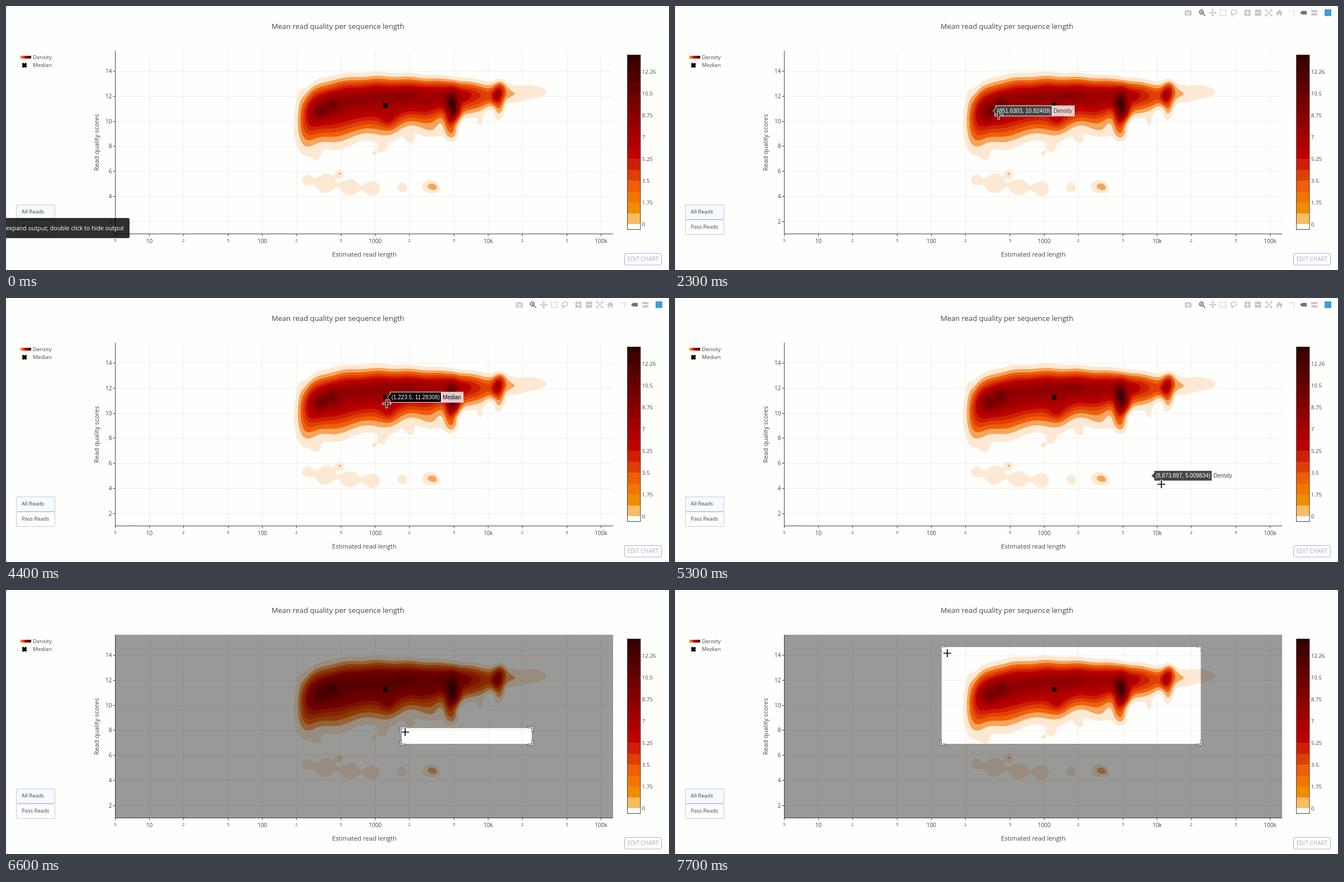
An HTML page that plays this animation: 1186x472 px, repeating every 8000 ms.

```html
<!DOCTYPE html>
<html lang="en">
<head>
<meta charset="utf-8">
<title>Read quality chart</title>
<style>
  html, body { margin: 0; width: 100%; height: 100%; overflow: hidden; background: #fefefd; }
  svg { display: block; width: 100%; height: 100%; }
  text { font-family: "Open Sans", "Noto Sans", sans-serif; font-size: 9.7px; fill: #444; white-space: pre; }
  .tag text { font-family: "Liberation Sans", Arial, sans-serif; font-size: 10px; }
</style>
</head>
<body>
<svg id="stage" viewBox="0 0 1186 472"></svg>
<script>
const LOOP = 8000;
const PLOT = { l: 195.5, t: 80, r: 1086, b: 407.5 };
const MEDIAN = { x: 678.3, y: 177.4 };
const stage = document.getElementById('stage');

function el(tag, attrs, parent = stage, text) {
  const node = document.createElementNS('http://www.w3.org/2000/svg', tag);
  set(node, attrs);
  if (text !== undefined) node.textContent = text;
  parent.appendChild(node);
  return node;
}
function set(node, attrs) {
  for (const k in attrs) node.setAttribute(k, attrs[k]);
}
const group = (attrs = {}, parent = stage) => el('g', attrs, parent);
const label = (x, y, str, attrs = {}, parent = stage) => el('text', { x, y, ...attrs }, parent, str);
const show = (node, on) => set(node, { visibility: on ? 'visible' : 'hidden' });
const clamp01 = v => Math.min(1, Math.max(0, v));
const lerp = (a, b, k) => a + (b - a) * k;

// Axis scales
const px = lg => 256.5 + 202 * (lg - 1);
const py = v => 161.2 + 22.4 * (12 - v);

// Colour of a density level: orange to red, then red to near black
const mix = (a, b, k) => `rgb(${a.map((v, i) => Math.round(lerp(v, b[i], k)))})`;
const ORANGE = [240, 94, 8], RED = [190, 0, 0], DARK = [50, 0, 0];
const LEVELS = ['#fde9d3', '#f5a55c'];
for (let n = 3; n <= 15; n++) {
  LEVELS.push(n < 6 ? mix(ORANGE, RED, (n - 3) / 3) : mix(RED, DARK, (n - 6) / 9));
}

const bell = (d, s) => Math.exp(-d * d / (2 * s * s));
const rise = (x, mid, w) => 1 / (1 + Math.exp((mid - x) / w));

// Local clusters: x, y, spread x, spread y, strength
const CLUSTERS = [
  [561, 188, 9, 10, 2.5], [583, 176, 8, 11, 2.3], [706, 160, 14, 6, 1], [684, 205, 9, 9, 1.4],
  [798, 185, 8, 19, 10], [796, 228, 9, 12, 2], [822, 160, 5, 5, 1.2],
  [881, 156, 7, 12, 4.2], [881, 180, 7, 18, 2.4], [945, 154, 20, 10, 1],
  [556, 266, 7, 9, 1], [673, 256, 7, 7, 0.9], [722, 241, 9, 9, 0.9], [768, 225, 16, 11, 0.8],
  [850, 211, 6, 10, 0.9]
];
// Isolated patches: x, y, radius
[[539, 312, 7], [571, 317, 16], [597, 299, 5], [616, 324, 13.5], [656, 326, 12.5],
  [709, 325, 8.5], [755, 324, 10], [768, 324, 7], [660, 263, 3]
].forEach(([x, y, r]) => CLUSTERS.push([x, y, r, r, 1.7]));

// Density along one column: a skewed ridge plus the clusters
function column(x) {
  const fall = clamp01((x - 640) / 300);
  const mid = 160 + 45 * Math.exp((523 - x) / 55) - 0.06 * Math.max(0, x - 850) + 0.8 * Math.sin(x / 9);
  const up = 25 - 0.033 * (x - 560) + 16 * bell(x - 520, 7);
  const down = 38 - 26 * fall * fall * (3 - 2 * fall) + 2.5 * Math.cos((x - 680) * Math.PI / 40);
  const peak = 9.3 * rise(x, 533, 8.5) * (1 - rise(x, 855, 38));
  const near = CLUSTERS.filter(c => Math.abs(x - c[0]) < 4 * c[2] + 2);
  return y => {
    const wx = x + 1.5 * Math.sin(y / 8), wy = y + 1.2 * Math.sin(x / 7);
    return near.reduce((sum, [cx, cy, sx, sy, a]) => sum + a * bell(wx - cx, sx) * bell(wy - cy, sy),
      peak * bell(y - mid, y < mid ? up : down));
  };
}

// One path per level, built from thin upright strips
function drawDensity(parent) {
  const W = 0.5, TOP = 108, BOTTOM = 346;
  const paths = LEVELS.map(() => '');
  for (let x = 500; x < 990; x += W) {
    const at = column(x + W / 2);
    const vals = [];
    for (let y = TOP; y <= BOTTOM; y++) vals.push(at(y));
    const max = Math.max(...vals);
    for (let n = 1; n <= LEVELS.length && n < max; n++) {
      for (let i = 1; i < vals.length; i++) {
        const [a, b] = [vals[i - 1], vals[i]];
        if (a < n === b < n) continue;
        const y = (TOP + i - 1 + (n - a) / (b - a)).toFixed(1);
        paths[n - 1] += a < n ? `M${x} ${y}h${W}` : `V${y}h${-W}Z`;
      }
    }
  }
  paths.forEach((d, i) => d && el('path', { d, fill: LEVELS[i] }, parent));
  el('ellipse', { cx: 222.5, cy: 406.5, rx: 3, ry: 1.3, fill: LEVELS[0] }, parent);
}

const cross = (x, y, parent) => el('path', {
  d: 'M-3.4-3.4L3.4 3.4M-3.4 3.4L3.4-3.4', stroke: '#000', 'stroke-width': 4, transform: `translate(${x} ${y})`
}, parent);

function drawChart() {
  el('path', { d: 'M.5 0V472', stroke: '#f1f1ef' });
  const mid = { 'text-anchor': 'middle' };
  label(593.7, 40.7, 'Mean read quality per sequence length', { ...mid, style: 'font-size:13.05px' });
  label(641, 448, 'Estimated read length', { ...mid, style: 'font-size:11.3px' });
  label(0, 0, 'Read quality scores', {
    ...mid, style: 'font-size:11.3px', transform: 'translate(166.3 244) rotate(-90)'
  });

  const grid = group({ stroke: '#eee' });
  const ticks = group({ stroke: '#444' });
  const xTick = (lg, str, size, base) => {
    const x = Math.floor(px(lg)) + 0.5;
    if (x > 200) el('path', { d: `M${x} ${PLOT.t}V${PLOT.b}` }, grid);
    el('path', { d: `M${x} ${PLOT.b}v4` }, ticks);
    label(x, base, str, { ...mid, style: `font-size:${size}px` });
  };
  xTick(Math.log10(5), '5', 7.5, 422);
  ['10', '100', '1000', '10k', '100k'].forEach((str, i) => {
    xTick(i + 1, str, 10, 424);
    if (i < 4) [2, 5].forEach(m => xTick(i + 1 + Math.log10(m), m, 7.5, 422));
  });
  for (let v = 2; v <= 14; v += 2) {
    const y = Math.floor(py(v)) + 0.5;
    el('path', { d: `M${PLOT.l} ${y}H${PLOT.r}` }, grid);
    el('path', { d: `M${PLOT.l} ${y}h-4` }, ticks);
    label(189.5, y + 3.6, v, { 'text-anchor': 'end', style: 'font-size:10px' });
  }
  drawDensity(group());
  cross(MEDIAN.x, MEDIAN.y, stage);
  el('path', { d: `M${PLOT.l} ${PLOT.t}V${PLOT.b}H${PLOT.r}`, stroke: '#444', fill: 'none' });
}

function drawSides() {
  const ramp = el('linearGradient', { id: 'ramp' }, el('defs', {}));
  ['#f8bc63', LEVELS[2], LEVELS[5], LEVELS[9], LEVELS[14]].forEach((c, i) =>
    el('stop', { offset: i / 4, 'stop-color': c }, ramp));
  el('rect', { x: 25, y: 89, width: 20, height: 5, fill: 'url(#ramp)' });
  cross(33, 106, stage);
  label(48, 94.5, 'Density');
  label(48, 109.3, 'Median');

  const frame = { x: 1111.5, y: 87.5, width: 23.5, height: 312 };
  el('rect', { ...frame, fill: '#fff' });
  ['#f8bc63', '#f18c00', '#f37500', ...LEVELS.slice(2)].forEach((fill, i) => {
    const bottom = 390 - 19.5 * i;
    const top = Math.max(frame.y, bottom - 19.5);
    el('rect', { ...frame, y: top, height: bottom - top, fill, 'shape-rendering': 'crispEdges' });
  });
  el('rect', { ...frame, fill: 'none', stroke: '#444' });
  ['0', '1.75', '3.5', '5.25', '7', '8.75', '10.5', '12.26'].forEach((str, i) =>
    label(1137.8, 393.5 - 39 * i, str));

  const button = (y, str, fill, stroke) => {
    el('rect', { x: 18.5, y, width: 69, height: 26, rx: 1.5, fill, stroke });
    label(28, y + 15.3, str, { style: 'font-size:9.5px' });
  };
  button(355.5, 'All Reads', '#f4fafd', '#b9cfdd');
  button(382.5, 'Pass Reads', '#fefefe', '#c3cad3');
  el('rect', { x: 1106.5, y: 442.5, width: 66, height: 20.5, rx: 2.5, fill: '#fefefe', stroke: '#a2b1cc' });
  label(1139.5, 456.3, 'EDIT CHART', { 'text-anchor': 'middle', style: 'font-size:10px;fill:#a0afca' });
}

function drawToolbar() {
  const GREY = '#c7c7c7', ACTIVE = '#747474';
  const bar = group();
  const icon = (x, d, attrs) => el('path', {
    d, transform: `translate(${x} 12)`, 'fill-rule': 'evenodd', ...attrs
  }, bar);
  const solid = (x, d, fill = GREY) => icon(x, d, { fill });
  const line = (x, d, stroke = GREY, dash = 'none') =>
    icon(x, d, { fill: 'none', stroke, 'stroke-width': 1.7, 'stroke-dasharray': dash });
  const ring = r => `M${-r} .8a${r} ${r} 0 1 0 ${2 * r} 0a${r} ${r} 0 1 0 ${-2 * r} 0`;
  const box = 'M-5.5-5.5h11v11h-11Z';
  solid(918, 'M-6-3.5h3l1-1.5h4l1 1.5h3v8.5h-12Z' + ring(2.8) + ring(1.3));
  line(942.5, 'M-4.5-1.2a3.6 3.6 0 1 0 7.2 0a3.6 3.6 0 1 0-7.2 0M1.8 1.5L6 5.6M-2.5-1.2h3.2M-.9-2.8v3.2', ACTIVE);
  line(962, 'M-5.5 0h11M0-5.5v11M-1.8-4L0-5.6L1.8-4M-1.8 4L0 5.6L1.8 4M-4-1.8L-5.6 0L-4 1.8M4-1.8L5.6 0L4 1.8');
  line(980.5, 'M-5-5h10v10h-10Z', GREY, '2 1.3');
  line(999.5, 'M-3 2.6C-7-1-4-5 1-5S7 1 2 2.3S-5 1-3.5 3.5S-1.5 5-3.5 6');
  solid(1024, box + 'M-3.5-.8h2.7v-2.7h1.6v2.7h2.7v1.6h-2.7v2.7h-1.6v-2.7h-2.7Z');
  solid(1043, box + 'M-3.5-.8h7v1.6h-7Z');
  line(1062, 'M-5.5-2.5v-3h3M2.5-5.5h3v3M5.5 2.5v3h-3M-2.5 5.5h-3v-3M-4-4L4 4M-4 4L4-4');
  solid(1081, 'M0-5.5L6.3.3H4.5v5h-3v-3.3h-3v3.3h-3v-5h-1.8Z');
  line(1104, 'M-5-3.5H3.5V6', GREY, '2 1.5');
  solid(1124, 'M-6 0l3.5-3.3h8.5v6.6h-8.5Z', ACTIVE);
  solid(1143, 'M-6-2.8l2-2h10v4h-10ZM-6 3l2-2h10v4h-10Z');
  el('rect', { x: 1162, y: 6, width: 12, height: 12, fill: '#3a9fd9' }, bar);
  return bar;
}

function makeTag() {
  const node = group({ class: 'tag' });
  const name = el('rect', { height: 19.5, y: -9.75, fill: '#fff', 'fill-opacity': 0.8 }, node);
  const body = el('path', { stroke: '#fff' }, node);
  const coords = label(7.4, 3.6, '', { style: 'fill:#fff' }, node);
  const series = label(0, 3.6, '', {}, node);
  const num = v => v.toLocaleString('en-US', { maximumSignificantDigits: 7 });
  const place = (x, y, xv, yv, title, fill) => {
    coords.textContent = `(${num(xv)}, ${num(yv)})`;
    series.textContent = title;
    const end = 10 + coords.getComputedTextLength();
    set(body, { d: `M0 0l5-5v-4.2H${end}V9.2H5V5Z`, fill });
    set(series, { x: end + 2.8, style: `fill:${fill}` });
    set(name, { x: end, width: series.getComputedTextLength() + 7 });
    set(node, { transform: `translate(${x} ${y})` });
  };
  return { node, place };
}

drawChart();
drawSides();
const toolbar = drawToolbar();
const shade = el('path', { 'fill-rule': 'evenodd' });
const corners = el('path', { fill: '#fff', stroke: '#444' });
const tag = makeTag();

const tip = group();
el('rect', { x: -10, y: 379, width: 231, height: 36, rx: 3, 'fill-opacity': 0.81 }, tip);
label(211, 401, 'expand output; double click to hide output', {
  'text-anchor': 'end', style: 'font-size:10.65px;fill:#fff'
}, tip);

const arrow = el('path', { d: 'M0 0V13l3-2.7l2 5l2.2-1l-2-4.6h4Z', stroke: '#fff' });
const plus = group();
el('path', { d: 'M-8 0H8M0-8V8', stroke: '#fff', 'stroke-width': 3.6 }, plus);
el('path', { d: 'M-7 0H7M0-7V7', stroke: '#000', 'stroke-width': 1.7 }, plus);

// Pointer moves: start, end, to x, to y
const MOVES = [
  [800, 800, 9, 239], [900, 1100, 208, 285], [1200, 1600, 487, 266], [1700, 2300, 579, 195],
  [2300, 3200, 679, 189], [3300, 3400, 690, 186], [4300, 4400, 681, 189], [4500, 4600, 588, 255],
  [4700, 4900, 760, 208], [4900, 5100, 959, 250], [5100, 5300, 870, 333], [5400, 6200, 946, 281],
  [6200, 6300, 911, 287], [6300, 6600, 714, 254], [6600, 7200, 502, 124], [7400, 7700, 487, 113]
];
function pointer(t) {
  let [, , x, y] = MOVES[0];
  for (const [from, to, nx, ny] of MOVES.slice(1)) {
    const k = clamp01((t - from) / (to - from));
    x = lerp(x, nx, k);
    y = lerp(y, ny, k);
  }
  return [x, y];
}

// Hover values snap to the density grid
const GRID = { x: Math.log10(351.6303), y: 10.82409 };
GRID.dx = (Math.log10(8873.897) - GRID.x) / 20;
GRID.dy = (GRID.y - 5.009834) / 13;

function hover(x, y) {
  if (Math.hypot(x - MEDIAN.x, y - MEDIAN.y) < 14) {
    tag.place(682, MEDIAN.y, 1223.5, 11.28308, 'Median', '#000');
    return;
  }
  const lg = GRID.x + GRID.dx * Math.round((x - px(GRID.x)) / (202 * GRID.dx));
  const v = GRID.y - GRID.dy * Math.round((y - py(GRID.y)) / (22.4 * GRID.dy));
  tag.place(px(lg), py(v), 10 ** lg, v, 'Density', '#444');
}

function zoomBox(t, x, y) {
  const step = (t - 6300) / 100;
  const lag = 5 + 5 * step / 14;
  const l = x - lag, r = 940.5, b = 275;
  let top = y - lag - 1, bottom = b, d;
  if (b - top < 20) {
    top = PLOT.t;
    bottom = PLOT.b;
    d = `M${l - 0.5} ${b - 16.5}h-2.5v33h2.5ZM${r + 0.5} ${b - 16.5}h2.5v33h-2.5Z`;
  } else {
    const corner = (cx, cy, sx, sy) =>
      `M${cx - 2.9 * sx} ${cy + 7 * sy}h${2.5 * sx}v${-7.4 * sy}h${7.4 * sx}v${-2.5 * sy}h${-9.9 * sx}Z`;
    d = corner(l, top, 1, 1) + corner(r, top, -1, 1) + corner(l, b, 1, -1) + corner(r, b, -1, -1);
  }
  const alpha = Math.min(0.4, 0.06 + 0.14 * step);
  set(shade, {
    d: `M${PLOT.l} ${PLOT.t}H${PLOT.r}V${PLOT.b}H${PLOT.l}ZM${l} ${top}H${r}V${bottom}H${l}Z`,
    'fill-opacity': alpha
  });
  set(corners, { d, opacity: Math.min(1, alpha / 0.4 + 0.1) });
}

function draw(t) {
  const [x, y] = pointer(t);
  const inPlot = x > PLOT.l;
  const hovering = t >= 1300 && t < 6200;
  const dragging = t >= 6300;

  show(tip, t < 600);
  show(arrow, t >= 800 && !inPlot);
  show(plus, inPlot);
  set(inPlot ? plus : arrow, { transform: `translate(${x} ${y})` });
  set(toolbar, { opacity: clamp01((t - 900) / 300) * clamp01((6450 - t) / 300) });
  show(tag.node, hovering);
  if (hovering) hover(x - 11, y - 12);
  show(shade, dragging);
  show(corners, dragging);
  if (dragging) zoomBox(t, x, y);
}

// The picture changes in steps of 100 ms
const start = performance.now();
let shown = -1;
function tick() {
  const t = Math.floor((performance.now() - start) % LOOP / 100) * 100;
  if (t !== shown) draw(shown = t);
  requestAnimationFrame(tick);
}
tick();
</script>
</body>
</html>
```
